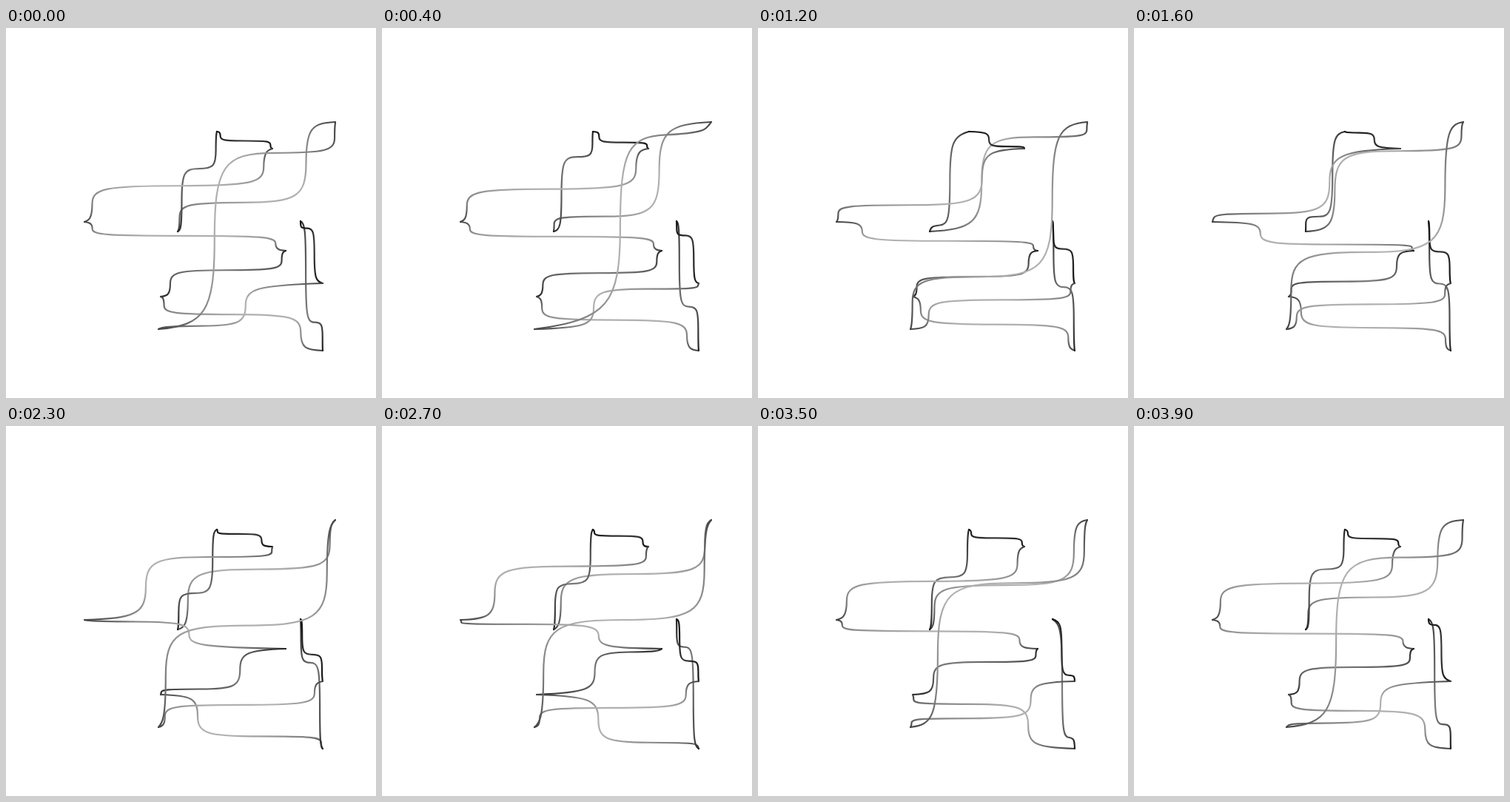
An HTML page without scripts for the animation above (4 s loop, 500x500 px).

```html
<!DOCTYPE html>
<html lang="en">
<head>
<meta charset="utf-8">
<title>Wandering staircase loop</title>
<style>
  html, body { margin: 0; width: 100%; height: 100%; overflow: hidden; background: #fff; }
  svg { display: block; width: 100vw; height: 100vh; }

  path {
    fill: none;
    stroke-width: 2.2;
    stroke-linecap: round;
    stroke-linejoin: round;
    vector-effect: non-scaling-stroke;
    animation: climb 4s linear infinite;
    animation-delay: calc(var(--i) * 4s / 11 - 5.2s);
  }
  /* The second half of the cycle is the first half turned round and run backwards. */
  path + path { animation-direction: reverse; }

  .long { stroke: url(#long); }
  .medium { stroke: url(#medium); }
  .short { stroke: url(#short); }

  /* Link from (0,0) to (1,1) */
  @keyframes climb {
    0%  { d: path("M0 0C.022 .02 .043 .04 .043 .25S.112 .5 .5 .5S.957 .538 .957 .75S.978 .98 1 1"); }
    10% { d: path("M0 0C.03 .015 .055 .04 .055 .263S.123 .527 .509 .527S.963 .562 .963 .763S.98 .98 1 1"); }
    20% { d: path("M0 0C.07 .01 .095 .046 .095 .309S.161 .618 .534 .618S.972 .647 .972 .809S.985 .985 1 1"); }
    30% { d: path("M0 0C.15 .011 .185 .06 .185 .372S.245 .735 .587 .735S.988 .755 .988 .868S.995 .99 1 1"); }
    40% { d: path("M0 0C.27 .02 .33 .083 .33 .441S.38 .862 .665 .862S.997 .872 .997 .931S1 .985 1 1"); }
    50% {
      d: path("M0 0C.43 .05 .5 .124 .5 .5S.55 .935 .75 .945S.96 .97 .985 .99S.99 .993 1 1");
      visibility: visible;
    }
    50.01%, 100% {
      d: path("M0 0C.43 .05 .5 .124 .5 .5S.55 .935 .75 .945S.96 .97 .985 .99S.99 .993 1 1");
      visibility: hidden;
    }
  }
</style>
</head>
<body>
<svg viewBox="0 0 500 500">
  <defs>
    <linearGradient id="long" gradientUnits="userSpaceOnUse" x1="0" y1="0" x2="1" y2="1">
      <stop offset="0" stop-color="#444"/>
      <stop offset=".15" stop-color="#808080"/>
      <stop offset=".4" stop-color="#b0b0b0"/>
      <stop offset=".6" stop-color="#b0b0b0"/>
      <stop offset=".85" stop-color="#808080"/>
      <stop offset="1" stop-color="#444"/>
    </linearGradient>
    <linearGradient id="medium" gradientUnits="userSpaceOnUse" x1="0" y1="0" x2="1" y2="1">
      <stop offset="0" stop-color="#222"/>
      <stop offset=".15" stop-color="#4c4c4c"/>
      <stop offset=".5" stop-color="#7c7c7c"/>
      <stop offset=".85" stop-color="#4c4c4c"/>
      <stop offset="1" stop-color="#222"/>
    </linearGradient>
    <linearGradient id="short" gradientUnits="userSpaceOnUse" x1="0" y1="0" x2="1" y2="1">
      <stop offset="0" stop-color="#111"/>
      <stop offset=".5" stop-color="#3a3a3a"/>
      <stop offset="1" stop-color="#111"/>
    </linearGradient>
  </defs>

  <g class="long" style="--i:0" transform="translate(445 127) scale(-213 148)"><path/><path transform="rotate(180 .5 .5)"/></g>
  <g class="medium" style="--i:1" transform="translate(232 275) scale(53 -135)"><path/><path transform="rotate(180 .5 .5)"/></g>
  <g class="short" style="--i:2" transform="translate(285 140) scale(75 23)"><path/><path transform="rotate(180 .5 .5)"/></g>
  <g class="long" style="--i:3" transform="translate(360 163) scale(-254 99)"><path/><path transform="rotate(180 .5 .5)"/></g>
  <g class="long" style="--i:4" transform="translate(106 262) scale(272 39)"><path/><path transform="rotate(180 .5 .5)"/></g>
  <g class="medium" style="--i:5" transform="translate(378 301) scale(-169 62)"><path/><path transform="rotate(180 .5 .5)"/></g>
  <g class="long" style="--i:6" transform="translate(209 363) scale(219 73)"><path/><path transform="rotate(180 .5 .5)"/></g>
  <g class="medium" style="--i:7" transform="translate(428 436) scale(-30 -175)"><path/><path transform="rotate(180 .5 .5)"/></g>
  <g class="short" style="--i:8" transform="translate(398 261) scale(30 84)"><path/><path transform="rotate(180 .5 .5)"/></g>
  <g class="long" style="--i:9" transform="translate(428 345) scale(-222 62)"><path/><path transform="rotate(180 .5 .5)"/></g>
  <g class="long" style="--i:10" transform="translate(206 407) scale(239 -280)"><path/><path transform="rotate(180 .5 .5)"/></g>
</svg>
</body>
</html>
```
